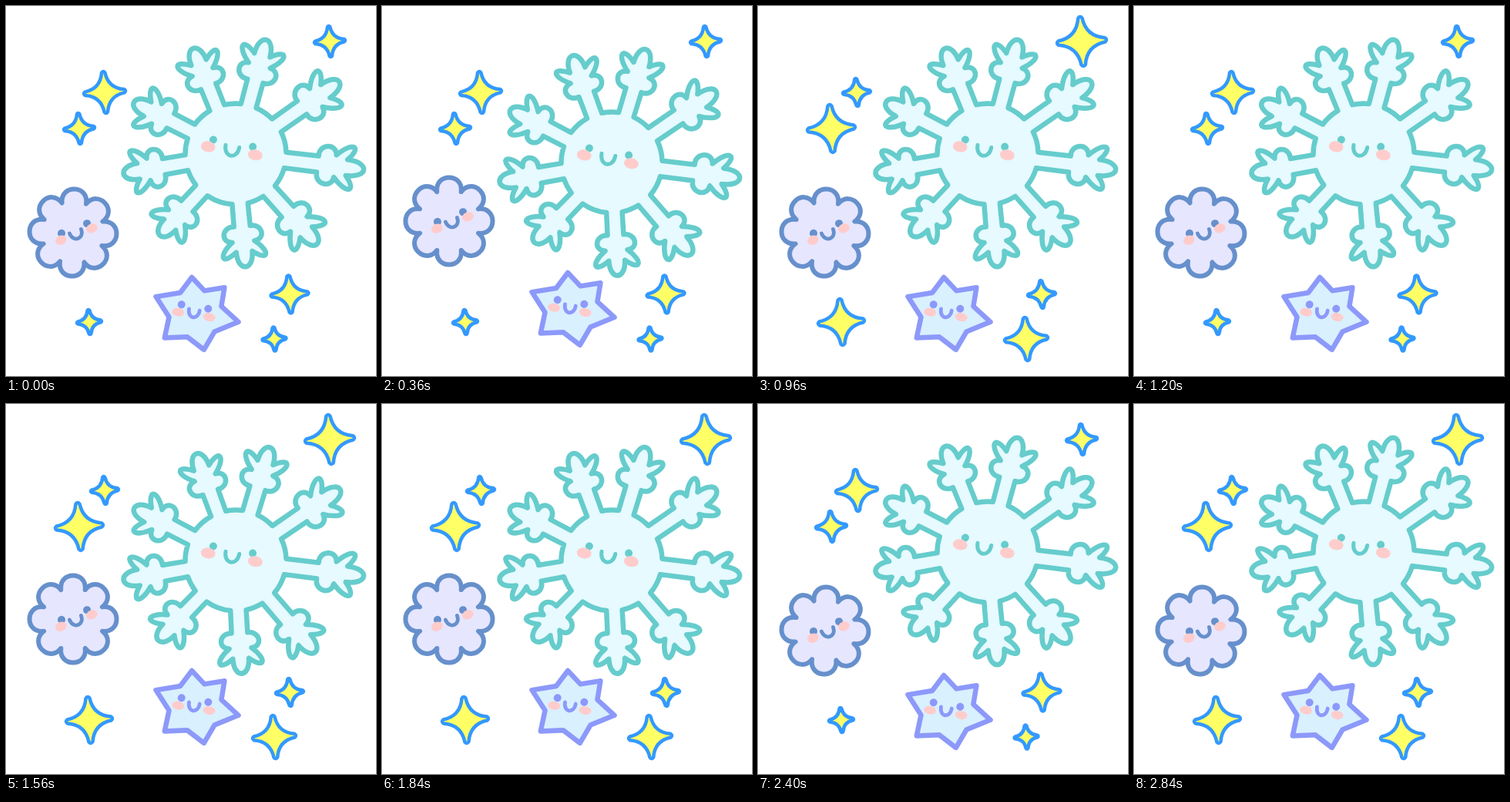
Recreate the animation shown at these times as an HTML page. Size 480 by 480 pixels, loop 2880 ms.

```html
<!DOCTYPE html>
<html lang="en">
<head>
<meta charset="utf-8">
<title>Snowflakes</title>
<style>
  html, body { margin: 0; width: 100%; height: 100%; overflow: hidden; background: #fff; }
  svg { display: block; width: 100vw; height: 100vh; }
</style>
</head>
<body>
<svg id="stage" viewBox="0 0 480 480" stroke-linejoin="round" stroke-linecap="round"></svg>
<script>
const LOOP = 2880, STEP = 40, TICK = 50;
const FLAKE_TICKS = 4, SPARK_TICKS = 10;
const TEAL = '#66cccc', BLUE = '#6690cc', VIOLET = '#8c99fa', SKY = '#3399ff', PINK = '#ffcccc';
const stage = document.getElementById('stage');

function add(parent, tag, attrs = {}) {
  const el = document.createElementNS('http://www.w3.org/2000/svg', tag);
  for (const key in attrs) el.setAttribute(key, attrs[key]);
  parent.appendChild(el);
  return el;
}

const rad = deg => deg * Math.PI / 180;
const fmt = p => p[0].toFixed(1) + ' ' + p[1].toFixed(1);
const polar = (cx, cy, r, deg) => [cx + r * Math.cos(rad(deg)), cy + r * Math.sin(rad(deg))];

function shape(parent, d, fill, stroke, width) {
  add(parent, 'path', { d, fill, stroke, 'stroke-width': width });
}

// Rounded bump from p to q whose crest passes through tip; bulge widens it.
function bump(p, tip, q, bulge = 0) {
  const control = (a, b) => [0, 1].map(i =>
    a[i] + (tip[i] - (p[i] + q[i]) / 2) * 4 / 3 + (a[i] - b[i]) * bulge);
  return 'C' + [control(p, q), control(q, p), q].map(fmt).join(' ');
}

// Two eyes, two cheeks and a smile around x, y; tilt turns the whole face.
function face(parent, color, x, y, tilt, { eye, cheek, drop, rx, ry, w, h, line }) {
  const g = add(parent, 'g', { transform: `translate(${x} ${y}) rotate(${tilt})` });
  const sides = [-1, 1];
  for (const s of sides) add(g, 'circle', { cx: s * eye, cy: 0, r: 5, fill: color });
  for (const s of sides) add(g, 'ellipse', { cx: s * cheek, cy: drop, rx, ry, fill: PINK });
  shape(g, `M${-w} 4 C${-w} ${4 + h * 1.33} ${w} ${4 + h * 1.33} ${w} 4`, 'none', color, line);
}

const armAngles = [7, 48, 85, 133, 170, 207, 248, 285, 325];

// Right half of a hand: distance along it, distance across it.
const fingers = [[0.17, 0.84], [0.38, 0.5], [0.73, 0.95], [0.63, 0.36]];

function bigFlake(parent, cy, sway) {
  const cx = 298, r = 65.5, half = 29, stem = 10.5;
  let d = '';
  armAngles.forEach(base => {
    const a = base + sway * Math.sin(rad(base)) ** 2;
    const reach = 153 + 10 * Math.cos(rad(base + 12)) + 5 * Math.cos(rad(2 * base));
    const neck = reach * 0.64;
    const at = (u, v) => {
      const [x, y] = polar(cx, cy, neck + (reach - neck) * u, a);
      return [x - Math.sin(rad(a)) * half * v, y + Math.cos(rad(a)) * half * v];
    };
    const side = [[0, stem / half], ...fingers];
    const pts = [
      ...side.map(([u, v]) => at(u, -v)), at(1, 0),
      ...side.reverse().map(([u, v]) => at(u, v))
    ];
    d += (d ? `A${r} ${r} 0 0 1 ` : 'M') + fmt(polar(cx, cy, r, a - 9)) + 'L' + fmt(pts[0]);
    for (let i = 0; i < 10; i += 2) d += bump(pts[i], pts[i + 1], pts[i + 2]);
    d += 'L' + fmt(polar(cx, cy, r, a + 9));
  });
  d += `A${r} ${r} 0 0 1 ` + d.slice(1, d.indexOf('L')) + 'Z';
  shape(parent, d, '#e6faff', TEAL, 6.5);
  face(parent, TEAL, cx - 3.5, cy - 14, 10,
    { eye: 26, cheek: 31, drop: 10, rx: 9.5, ry: 7, w: 9, h: 12.5, line: 5 });
}

function flower(parent, cy, turn) {
  const cx = 87, petals = 8, slice = 360 / petals;
  let d = 'M' + fmt(polar(cx, cy, 41, turn - slice / 2));
  for (let i = 0; i < petals; i++) {
    const a = turn + i * slice;
    const [from, to] = [-1, 1].map(s => polar(cx, cy, 41, a + s * slice / 2));
    d += bump(from, polar(cx, cy, 56.5, a), to, 0.1);
  }
  shape(parent, d + 'Z', '#e6e6ff', BLUE, 6);
  face(parent, BLUE, cx + 1.5, cy - 5.5, -21,
    { eye: 17.7, cheek: 21.5, drop: 8, rx: 7.5, ry: 6, w: 8, h: 10, line: 4.8 });
}

function smallStar(parent, cy) {
  const cx = 246, tips = [-96, -42, 11, 77, 142, 203];
  const radius = a => 51.5 + 5 * Math.cos(rad(2 * (a - 10)));
  const pts = tips.flatMap((a, i) => {
    const next = i < 5 ? tips[i + 1] : tips[0] + 360;
    const mid = (a + next) / 2;
    const inner = (radius(a) + radius(next)) / 2 * 0.65;
    return [polar(cx, cy, radius(a), a), polar(cx, cy, inner, mid)];
  });
  shape(parent, 'M' + pts.map(fmt).join('L') + 'Z', '#d9f0ff', VIOLET, 6.5);
  face(parent, VIOLET, cx - 1, cy - 9, 9,
    { eye: 17.5, cheek: 20.5, drop: 10.5, rx: 8, ry: 5.5, w: 7, h: 10, line: 4.8 });
}

// x, y and the size in each pose.
const sparkSpots = [
  [420, 46, 20, 32], [128, 112, 27, 18], [95, 159, 20, 31],
  [368, 374, 24.5, 18], [348, 432, 15.5, 28], [108, 410, 16, 30]
];

function sparkle(parent, x, y, r) {
  const blunt = 5, tilt = -4;
  let d = 'M' + fmt(polar(x, y, r * 0.95, tilt - blunt));
  for (let a = tilt; a < tilt + 360; a += 90) {
    d += 'Q' + fmt(polar(x, y, r * 1.06, a)) + ' ' + fmt(polar(x, y, r * 0.95, a + blunt));
    d += 'Q' + fmt(polar(x, y, r * 0.27, a + 45)) + ' ' + fmt(polar(x, y, r * 0.95, a + 90 - blunt));
  }
  shape(parent, d + 'Z', '#ffff66', SKY, 4.5);
}

const flakes = [add(stage, 'g'), add(stage, 'g')];
const sparks = [add(stage, 'g'), add(stage, 'g')];

flakes.forEach((g, pose) => {
  bigFlake(g, 192 + 11 * pose, 2 * pose);
  flower(g, 294 - 15 * pose, 2 - 2 * pose);
  smallStar(g, 399 - 6 * pose);
});
sparks.forEach((g, pose) => {
  for (const [x, y, ...sizes] of sparkSpots) sparkle(g, x, y, sizes[pose]);
});

function show(poses, index) {
  poses.forEach((g, i) => g.setAttribute('display', i === index ? 'inline' : 'none'));
}

function draw(ms) {
  const t = Math.floor((ms % LOOP) / STEP) * STEP;
  const tick = Math.floor((t + 10) / TICK);
  show(flakes, Math.floor(tick / FLAKE_TICKS) % 2);
  show(sparks, Math.floor(tick / SPARK_TICKS) % 2);
}

const begin = performance.now();
function loop() {
  draw(performance.now() - begin);
  requestAnimationFrame(loop);
}
draw(0);
requestAnimationFrame(loop);
</script>
</body>
</html>
```
